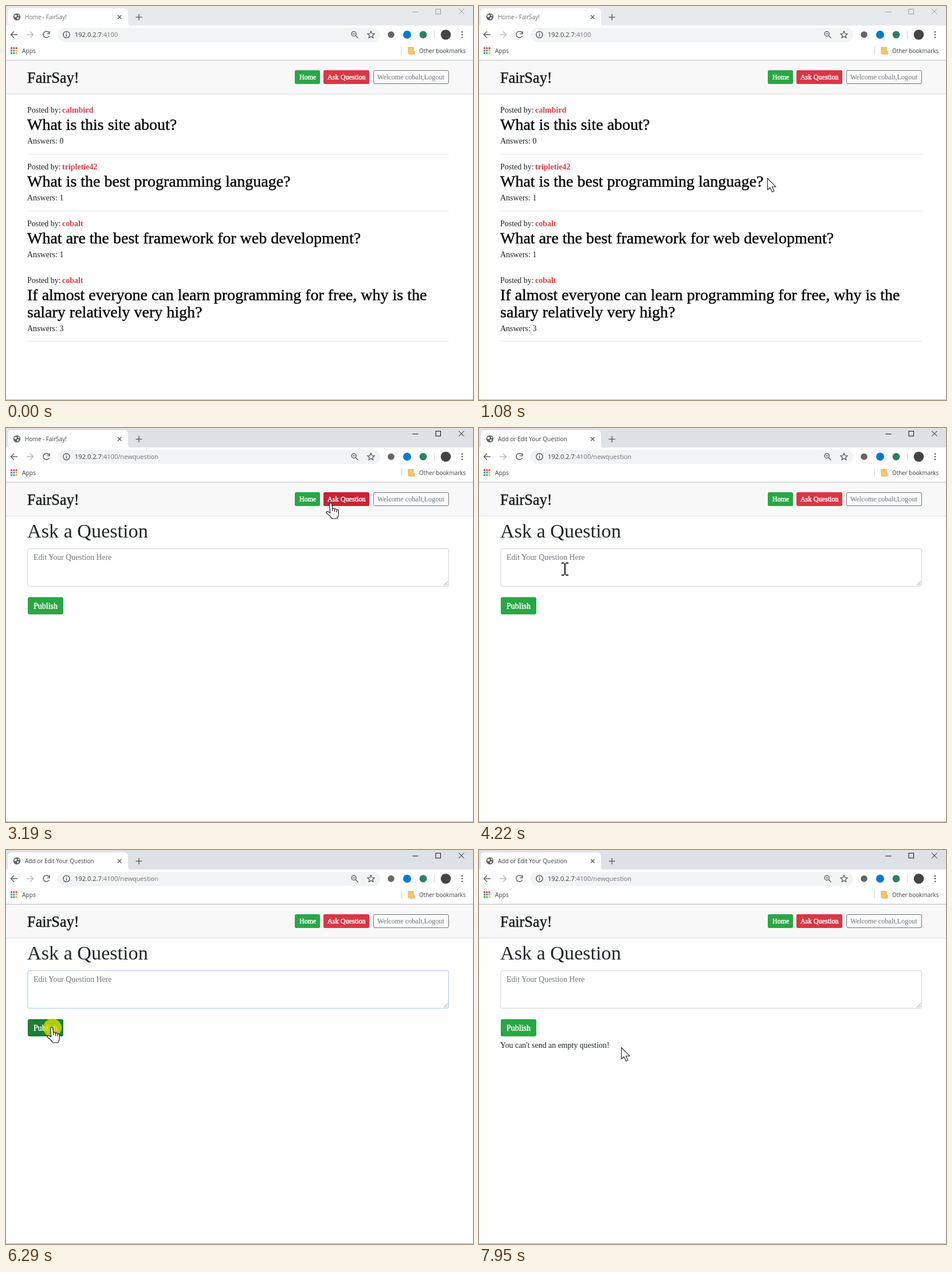
Write an HTML page that moves like this. It is 815 by 687 pixels and loops after 8 s.

```html
<!DOCTYPE html>
<html lang="en">
<head>
<meta charset="utf-8">
<title>Question board</title>
<style>
  html, body { margin: 0; width: 100%; height: 100%; overflow: hidden; background: #fefefe; }
  svg { display: block; width: 100vw; height: 100vh; }
  text { white-space: pre; }
  .serif { font-family: "Liberation Serif", serif; fill: #212529; }
  .ui { font-family: "Open Sans", sans-serif; fill: #3c4043; }
  .medium { stroke: currentColor; stroke-width: .45px; }
  .line { fill: none; stroke: #5f6368; stroke-width: 1.5; }
</style>
</head>
<body>
<svg id="stage" viewBox="0 0 815 687" xmlns="http://www.w3.org/2000/svg"></svg>
<script>
const LOOP = 8000;
const stage = document.getElementById("stage");

const text = (x, y, size, str, attrs = 'class="serif"') =>
  `<text x="${x}" y="${y}" font-size="${size}" ${attrs}>${str}</text>`;
const medium = (x, y, size, str, color) =>
  text(x, y, size, str, `class="serif medium" style="fill:${color};color:${color}"`);
const ui = (x, y, size, str, extra = "") => text(x, y, size, str, `class="ui" ${extra}`);
const rect = (x, y, w, h, fill, extra = "") =>
  `<rect x="${x}" y="${y}" width="${w}" height="${h}" fill="${fill}" ${extra}/>`;
const circle = (x, y, r, fill, extra = "") =>
  `<circle cx="${x}" cy="${y}" r="${r}" fill="${fill}" ${extra}/>`;
const path = (d, extra = 'class="line"') => `<path d="${d}" ${extra}/>`;

const posts = [
  { top: 181, user: "calmbird", lines: ["What is this site about?"], ends: [298], answers: 0, rule: 258 },
  { top: 280, user: "tripletie42", lines: ["What is the best programming language?"], ends: [498], answers: 1, rule: 357 },
  { top: 379, user: "cobalt", lines: ["What are the best framework for web development?"], ends: [621], answers: 1 },
  { top: 478, user: "cobalt", lines: ["If almost everyone can learn programming for free, why is the",
    "salary relatively very high?"], ends: [735, 335], answers: 3, rule: 584 }
];

function browserFrame() {
  const apps = [...Array(9).keys()].map(i =>
    rect(8 + i % 3 * 4.3, 72 + Math.floor(i / 3) * 4.3, 3, 3,
      ["#e04a3f", "#e04a3f", "#e04a3f", "#34a05a", "#4a86e0", "#e8b23a", "#34a05a", "#34a05a", "#e8b23a"][i])).join("");
  return rect(0, 0, 815, 35, "#e7eaed", 'id="titleBar"') +
    path("M0 35Q3 34 3 29V11Q3 4 10 4H206Q213 4 213 11V29Q213 34 218 35Z", 'fill="#fff"') +
    rect(0, 34, 815, 60, "#fff") +
    circle(19, 19, 6.2, "#5f6368") +
    path("M14 17L18 15L19 18L16 20ZM20 14L24 17L22 18ZM19 20L23 20L20 24Z", 'fill="#fff"') +
    ui(33, 23, 10, "", 'id="tabTitle"') +
    path("M195 16l6.5 6.5M201.500 16l-6.500 6.500M226.500 19.500h11M232 14v11") +
    `<g id="controls" fill="none" stroke="#888">` +
      path("M709.500 10.500h10M790 5l9.500 9.500M799.500 5l-9.500 9.500", "") +
      `<rect x="750" y="5.500" width="8.500" height="8.500"/></g>` +
    path("M20 50H9M14 44.500L8.500 50L14 55.500") +
    path("M36 50H47M42 44.500L47.500 50L42 55.500", 'class="line" style="stroke:#b8babd"') +
    path("M75 46.500A5.500 5.500 0 1 0 75.500 52M76 44V48.500H71.500") +
    rect(90, 38, 563, 25, "#f1f3f4", 'rx="12.500"') +
    circle(105.5, 50, 5.6, "none", 'class="line" stroke-width="1.2"') +
    path("M105.500 49V53M105.500 46.500V47.800") +
    `<text x="120" y="54" font-size="11.1" class="ui">192.0.2.7<tspan fill="#73777c" id="url"></tspan></text>` +
    circle(607, 48.5, 4, "none", 'class="line"') + path("M610 51.500L614.500 56M605 48.500h4") +
    path("M637 44l1.800 4 4.200.400-3.200 2.800 1 4.300-3.800-2.300-3.800 2.300 1-4.300-3.200-2.800 4.200-.400Z",
      'fill="none" stroke="#4b4f53" stroke-width="1.2"') +
    circle(672, 50, 5.8, "#666") + circle(700, 50, 7, "#087bd1") + circle(728, 50, 6.4, "#2c8064") +
    path("M747.500 43V57M690.500 71V85", 'stroke="#d0d2d4"') +
    circle(767.5, 50, 8.8, "#444") +
    [45.3, 50, 54.7].map(y => circle(796, y, 1.3, "#55595d")).join("") +
    apps + ui(28, 82, 10.2, "Apps") +
    path("M702 72H711V79H713V84H704Q702 84 702 82Z", 'fill="#f6c56f" stroke="#dba23c" stroke-width=".8"') +
    ui(721, 82, 9.9, "Other bookmarks") +
    rect(0, 94, 815, 1, "#b9bbbd") + rect(0, 686, 815, 1, "#b0b0b0");
}

function navBar() {
  return rect(0, 95, 815, 58, "#f8f8f8") + rect(0, 153, 815, 1, "#dcdcdc") +
    medium(37, 134, 26.3, "FairSay!", "#17191c") +
    rect(504, 112, 44, 24, "#28a745", 'rx="2.500" id="homeButton"') + medium(512, 128, 12, "Home", "#fff") +
    rect(554, 112, 80, 24, "#dc3545", 'rx="2.500" id="askButton"') + medium(561, 128, 12.2, "Ask Question", "#fff") +
    rect(641.5, 112.5, 131, 23, "#fbfbfb", 'rx="2.500" stroke="#6c757d"') +
    text(648, 128, 12.2, "Welcome cobalt,Logout", 'class="serif" style="fill:#6c757d"');
}

function postList() {
  return posts.map((p, n) => {
    const last = p.top + 35 + (p.lines.length - 1) * 30;
    return text(37, p.top + 5, 14, "Posted by:") +
      text(98, p.top + 5, 14, p.user, 'class="serif" font-weight="bold" style="fill:#dc3f48"') +
      p.lines.map((s, i) => medium(37, p.top + 35 + i * 30, 28, s, "#080808")).join("") +
      `<g id="under${n}">` + p.ends.map((e, i) => rect(37, p.top + 38 + i * 30, e - 37, 1.5, "#111")).join("") + `</g>` +
      text(37, last + 24, 14, "Answers: " + p.answers) +
      (p.rule ? rect(37, p.rule, 736, 1, "#e6e6e6") : "");
  }).join("");
}

function questionForm() {
  return text(37, 191, 34.2, "Ask a Question") +
    `<rect id="halo" x="36.500" y="209" width="737.500" height="69" rx="4" fill="none" stroke="#b9dbff" stroke-width="3"/>` +
    rect(38, 210.5, 734.5, 65.5, "#fff", 'rx="2.500" id="field"') +
    text(48, 230, 13.8, "Edit Your Question Here", 'class="serif" style="fill:#70777e"') +
    path("M764 274.500L771 267.500M768 274.500L771 271.500", 'stroke="#777" stroke-width=".9"') +
    rect(47, 217, 1, 17, "#111", 'id="caret"') +
    rect(38, 295, 62, 30, "#28a745", 'rx="3" id="publish"') + medium(48, 315, 14, "Publish", "#fff") +
    text(37, 345, 13.9, "You can't send an empty question!", 'class="serif" id="warning"');
}

const pointers =
  `<g id="arrow">` + path("M.5 .5V20.500L5 16.500L8.700 24.300L12 22.800L8.500 15.200H15Z",
    'fill="#fff" stroke="#222" stroke-width="1.1" stroke-linejoin="round"') + `</g>` +
  `<g id="hand">` + path("M-2.600 2Q-2.600 0 -.600 0Q1.600 0 1.800 2L2.600 9.500Q5 8 6.500 10.500Q9 9 10 11.500Q13 10.500 13.300 14V19Q13 23 10.800 27H1.500Q-1 22 -7 18Q-9 16 -7 14.800Q-5 13.800 -1.300 17ZM2.600 9.500V14M6.500 10.500V15M10 11.500V16",
    'fill="#fff" stroke="#1b1b1b" stroke-width="1.2" stroke-linejoin="round"') + `</g>` +
  `<g id="beam">` + path("M-6 -10.500H-1.500M1.500 -10.500H6M-6 10.500H-1.500M1.500 10.500H6M0 -10V10",
    'fill="none" stroke="#111" stroke-width="2"') + `</g>`;

stage.innerHTML = rect(0, 0, 815, 687, "#fefefe") + browserFrame() + navBar() +
  `<g id="home">${postList()}</g><g id="form">${questionForm()}</g>` +
  circle(0, 0, 16, "#d8e000", 'id="press" fill-opacity=".78"') + `<g id="pointer">${pointers}</g>`;

const el = {};
stage.querySelectorAll("[id]").forEach(node => el[node.id] = node);

// time, x, y of the pointer's hot spot
const route = [
  [230, 660, 622], [480, 585, 500], [700, 530, 395], [840, 501, 230], [1020, 503, 300],
  [1080, 503, 300], [1400, 462, 314], [1860, 448, 153], [2010, 448, 153], [2330, 566, 130],
  [2500, 567, 131], [3340, 567, 131], [3700, 420, 301], [4130, 150, 246], [4220, 150, 246],
  [4590, 147, 241], [5220, 147, 241], [5370, 142, 244], [5480, 142, 244], [5530, 138.5, 250],
  [6200, 80, 309], [6600, 80, 309], [7130, 276, 334], [7310, 262, 331], [7410, 262, 331],
  [7600, 240, 359], [7780, 224, 320], [7950, 248, 344]
];

const ramp = (t, a, b) => Math.min(1, Math.max(0, (t - a) / (b - a)));
const pulse = (t, a, b) => ramp(t, a, a + 150) * (1 - ramp(t, b, b + 150));
const show = (node, on) => node.setAttribute("display", on ? "inline" : "none");
const mix = (a, b, k) => `rgb(${a.map((v, i) => Math.round(v + (b[i] - v) * k))})`;
const inside = (p, x, y, w, h) => p.x >= x && p.x <= x + w && p.y >= y && p.y <= y + h;

function pointerAt(t) {
  const i = route.findIndex(k => k[0] > t);
  if (i < 1) {
    const [, x, y] = route[i < 0 ? route.length - 1 : 0];
    return { x, y };
  }
  const [a, b] = [route[i - 1], route[i]];
  const u = ramp(t, a[0], b[0]), k = u * u * (3 - 2 * u);
  return { x: a[1] + (b[1] - a[1]) * k, y: a[2] + (b[2] - a[2]) * k };
}

function draw(t) {
  const p = pointerAt(t);
  const onForm = t >= 3100, active = t >= 3020, titled = t >= 3340;
  show(el.home, !onForm);
  show(el.form, onForm);

  el.titleBar.setAttribute("fill", active ? "#dee1e6" : "#e7eaed");
  el.controls.setAttribute("stroke", active ? "#111" : "#999");
  el.tabTitle.textContent = titled ? "Add or Edit Your Question" : "Home - FairSay!";
  el.tabTitle.style.fill = active ? "#3c4043" : "#6a6e73";
  el.url.textContent = active ? ":4100/newquestion" : ":4100";

  let link = inside(p, 504, 112, 44, 24) || inside(p, 554, 112, 80, 24) || (onForm && inside(p, 38, 295, 62, 30));
  posts.forEach((post, n) => {
    const over = !onForm && t >= 230 &&
      post.ends.some((end, i) => inside(p, 37, post.top + 11 + i * 30, end - 37, 30));
    show(el["under" + n], over);
    link = link || over;
  });
  const typing = onForm && inside(p, 38, 211, 735, 65);
  show(el.pointer, t >= 230);
  show(el.hand, link);
  show(el.beam, typing);
  show(el.arrow, !link && !typing);
  el.pointer.setAttribute("transform", `translate(${p.x.toFixed(1)} ${p.y.toFixed(1)})`);

  const pressed = [[2400, 2500], [4330, 4480], [6210, 6370]].some(([a, b]) => t >= a && t < b);
  show(el.press, pressed);
  el.press.setAttribute("cx", p.x + 1);
  el.press.setAttribute("cy", p.y + 1);

  const green = [40, 167, 69];
  el.homeButton.setAttribute("fill", mix(green, [33, 136, 56], pulse(t, 2150, 2260)));
  el.askButton.setAttribute("fill", mix([220, 53, 69], [200, 35, 51], pulse(t, 2290, 3400)));
  el.publish.setAttribute("fill", mix(green, [30, 126, 52], pulse(t, 6070, 6660)));

  const focus = ramp(t, 4440, 4590);
  el.halo.setAttribute("opacity", focus * (1 - ramp(t, 6200, 6290)));
  el.field.setAttribute("stroke", mix([206, 212, 218], [128, 189, 255], focus * (1 - ramp(t, 6220, 6390))));
  show(el.caret, t >= 4460 && t < 6210 && Math.floor((t - 4460) / 530) % 2 === 0);
  show(el.warning, t >= 6370);
}

function tick() {
  draw(performance.now() % LOOP);
  requestAnimationFrame(tick);
}
tick();
</script>
</body>
</html>
```
